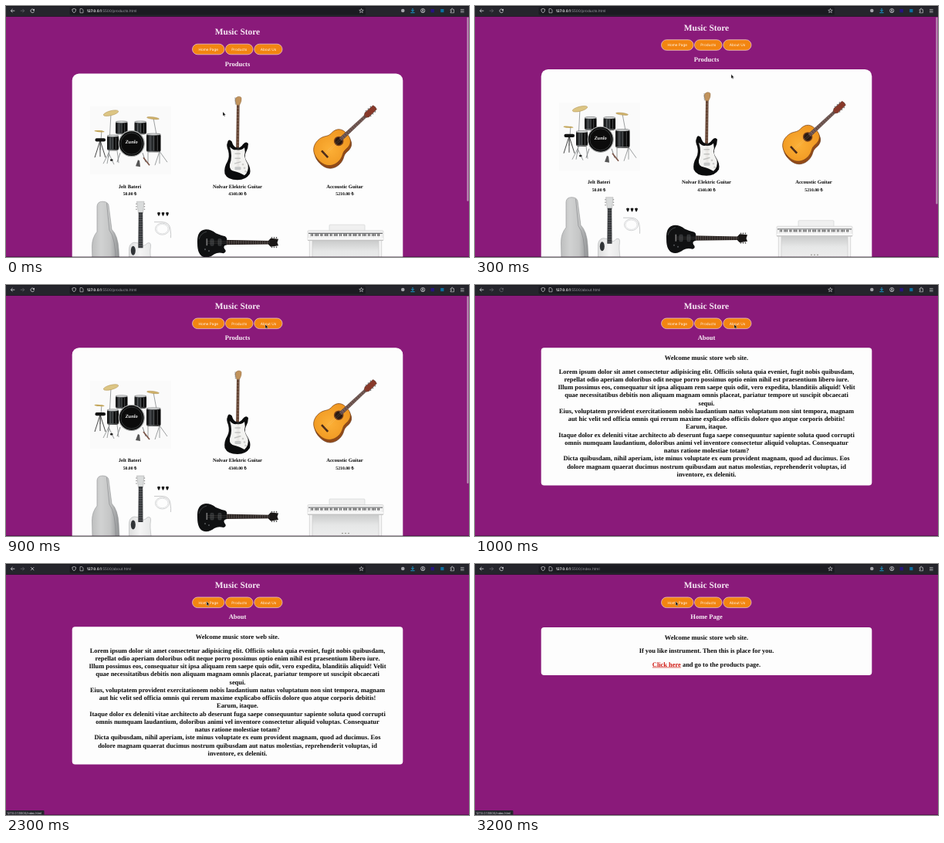
Write an HTML page with a canvas that moves like this. It is 600x325 px and loops after 3.3 s.

```html
<!DOCTYPE html>
<html lang="en">
<head>
<meta charset="utf-8">
<title>Music Store</title>
<style>
html, body { margin: 0; width: 100%; height: 100%; overflow: hidden; background: #8a1a7a; }
canvas { display: block; width: 600px; height: 325px; }
</style>
</head>
<body>
<canvas id="stage"></canvas>
<script>
const W = 600, H = 325, LOOP = 3300, STEP = 100;
const SERIF = '"Liberation Serif", "Times New Roman", serif';
const SANS = 'Inter, "Liberation Sans", sans-serif';
const canvas = document.getElementById('stage');
const ctx = canvas.getContext('2d');
const dpr = window.devicePixelRatio || 1;
canvas.width = W * dpr;
canvas.height = H * dpr;
ctx.textRendering = 'geometricPrecision';

const ABOUT = [
  'Lorem ipsum dolor sit amet consectetur adipisicing elit. Officiis soluta quia eveniet, fugit nobis quibusdam,',
  'repellat odio aperiam doloribus odit neque porro possimus optio enim nihil est praesentium libero iure.',
  'Illum possimus eos, consequatur sit ipsa aliquam rem saepe quis odit, vero expedita, blanditiis aliquid! Velit',
  'quae necessitatibus debitis non aliquam magnam omnis placeat, pariatur tempore ut suscipit obcaecati',
  'sequi.',
  'Eius, voluptatem provident exercitationem nobis laudantium natus voluptatum non sint tempora, magnam',
  'aut hic velit sed officia omnis qui rerum maxime explicabo officiis dolore quo atque corporis debitis!',
  'Earum, itaque.',
  'Itaque dolor ex deleniti vitae architecto ab deserunt fuga saepe consequuntur sapiente soluta quod corrupti',
  'omnis numquam laudantium, doloribus animi vel inventore consectetur aliquid voluptas. Consequatur',
  'natus ratione molestiae totam?',
  'Dicta quibusdam, nihil aperiam, iste minus voluptate ex eum provident magnam, quod ad ducimus. Eos',
  'dolore magnam quaerat ducimus nostrum quibusdam aut natus molestias, reprehenderit voluptas, id',
  'inventore, ex deleniti.'
];
const PRODUCTS = [
  ['Jelt Bateri', '50.00 ₺', 160.5],
  ['Nolvar Elektric Guitar', '4340.00 ₺', 300],
  ['Accoustic Guitar', '5210.00 ₺', 439]
];
const BUTTONS = [['Home Page', 241.5, 41.5], ['Products', 284.5, 35.5], ['About Us', 321.8, 36.2]];
// time, x, y of the pointer tip
const PATH = [[0, 281, 137], [300, 332, 88.5], [700, 336, 51], [1100, 336, 51], [1500, 260, 48.5]];

function rect(x, y, w, h, fill) {
  ctx.fillStyle = fill;
  ctx.fillRect(x, y, w, h);
}
function round(x, y, w, h, r, fill, stroke, lw = 0.7) {
  ctx.beginPath();
  ctx.roundRect(x, y, w, h, r);
  if (fill) { ctx.fillStyle = fill; ctx.fill(); }
  if (stroke) { ctx.strokeStyle = stroke; ctx.lineWidth = lw; ctx.stroke(); }
}
function oval(x, y, rx, ry, rot, fill, stroke, lw = 0.8) {
  ctx.beginPath();
  ctx.ellipse(x, y, rx, ry, rot, 0, Math.PI * 2);
  if (fill) { ctx.fillStyle = fill; ctx.fill(); }
  if (stroke) { ctx.strokeStyle = stroke; ctx.lineWidth = lw; ctx.stroke(); }
}
function shape(d, fill, stroke, lw = 0.8) {
  const p = new Path2D(d);
  if (fill) { ctx.fillStyle = fill; ctx.fill(p); }
  if (stroke) { ctx.strokeStyle = stroke; ctx.lineWidth = lw; ctx.stroke(p); }
}
function text(s, x, y, font, fill, align = 'center') {
  ctx.font = font;
  ctx.textAlign = align;
  ctx.fillStyle = fill;
  ctx.fillText(s, x, y);
}
const serif = (s, x, y, size, fill = '#080808', align) =>
  text(s, x, y, `bold ${size}px ${SERIF}`, fill, align);
function blend(x0, y0, x1, y1, ...stops) {
  const g = ctx.createLinearGradient(x0, y0, x1, y1);
  stops.forEach((c, i) => g.addColorStop(i / (stops.length - 1), c));
  return g;
}

function drum(x, y, w, h) {
  round(x, y, w, h, 3, blend(x, 0, x + w, 0, '#111', '#33373a', '#0b0b0b', '#050505'));
  oval(x + w / 2, y + 1, w / 2, 1.3, 0, '#d4d6d6', '#6e7173', 0.5);
  rect(x + 1, y + h - 1.3, w - 2, 0.7, '#a9abab');
  for (let i = 1; i < 4; i++) rect(x + w * i / 4, y + 3, 0.5, h - 5, '#8f9294');
}

function drumKit() {
  rect(109, 124, 105, 88, '#fafafa');
  const metal = '#85888a';
  shape('M136 133 L133 190 M133 184 L126 198 M133 184 L140 199 M191 139 L199 182 M199 182 L193 200 M199 182 L209 196 M124 155 L122 180', null, metal, 0.8);
  oval(136, 132.5, 10, 3, -0.25, '#dcc584', '#ab8a45', 0.5);
  oval(190.5, 139, 8, 1.4, 0.12, '#d0b26a', '#a08144', 0.4);
  oval(121, 156, 6.5, 1.1, 0.08, '#c4a75c');
  shape('M122 168 L115 190 M122 168 L129 190 M122 168 V189', null, '#333', 0.9);
  round(115.5, 165, 13.5, 4.2, 2, '#121212');
  drum(142, 143, 15.5, 17);
  drum(166.5, 143, 15.5, 17);
  drum(131, 161, 15, 20);
  shape('M134 181 L131 198 M144 181 L146 197 M184 183 V198 M199 183 V198', null, metal, 0.8);
  drum(182, 159, 18.5, 24);
  oval(162.7, 172, 16.5, 16.5, 0, '#0b0b0b', '#a9abab', 1.2);
  oval(162.7, 172, 14, 14, 0, null, '#44484a', 0.7);
  text('Zunlo', 162.7, 172, `italic bold 6.4px ${SERIF}`, '#f4f4f4');
  shape('M148 184 L144 196 M177 184 L181 196', null, metal, 1);
  shape('M168 201 L171 193 L173 194 L174 202 Z', '#555');
  shape('M178 190 L186 200', null, '#7b5548', 1.6);
  round(135, 192, 3.5, 2.5, 1, '#222');
}

function electric() {
  shape('M299 119 H302.6 L302 178 H298.2 Z', '#5b3826');
  for (let i = 0; i < 14; i++) rect(299, 122 + i * 4, 3, 0.35, '#a8907c');
  shape('M298.9 122 L297 116 Q297 112 301 111 Q305.5 111 305 114 Q305.5 117 302.6 122 Z', '#c1935c', '#8e6840', 0.5);
  for (let i = 0; i < 5; i++) oval(297 + i * 0.1, 113 + i * 1.9, 0.7, 0.6, 0, '#777');
  shape('M287 171 Q288 165 292.5 169 Q295 177 299 177 Q304 178 307 173 Q311 168 314 172 Q314 178 311 183 Q308 189 312 195 Q318 204 316 211 Q311 219 300 219 Q287 219 283.5 211 Q282 203 287 195 Q290 189 288 181 Q285 174 287 171 Z', '#0b0c0d');
  shape('M290 176 Q294 181 299 180 Q305 181 309 177 Q310.5 183 309 188 Q310 193 313.5 199 Q315 208 309 213 Q302 209 297 208 Q289 207 290 199 Q294 188 290 176 Z', '#f3f3f1');
  shape('M296.5 185 H304 M296.5 191 H304 M296 198 L304.5 195.5', null, '#c3c5c3', 1.4);
  round(296.5, 202, 8, 4, 1, '#c6c8c8');
  shape('M299.8 122 V202 M301.7 122 V202', null, '#b4aaa2', 0.25);
  for (const [x, y] of [[307, 199], [309, 203.5], [310.5, 208]]) oval(x, y, 1, 1, 0, '#d9d9d4', '#999', 0.3);
}

function acoustic() {
  ctx.save();
  ctx.translate(418, 181);
  ctx.rotate(-0.75);
  const body = 'M-18 0 C-18 -15 -8 -20 2 -19 C10 -18 11 -13.5 18 -14 C28 -15 33 -8 32 0 C33 8 28 15 18 14 C11 13.5 10 18 2 19 C-8 20 -18 15 -18 0 Z';
  ctx.save();
  ctx.translate(-1.5, 3.5);
  shape(body, '#934a17', '#5b2e14', 0.6);
  ctx.restore();
  const wood = ctx.createRadialGradient(2, 0, 2, 4, 0, 28);
  wood.addColorStop(0, '#fbae35');
  wood.addColorStop(1, '#ee951f');
  shape(body, wood, '#7d451a', 0.7);
  oval(18, 0, 6.3, 6.3, 0, '#7a421c');
  oval(18, 0, 4.9, 4.9, 0, '#2a1a12');
  rect(-8, -6, 2.6, 12, '#4a2a18');
  shape('M21 -2.5 L66 -2 V2 L21 2.5 Z', '#5f4643');
  for (let i = 0; i < 12; i++) rect(25 + i * 3.3, -2.2, 0.35, 4.4, '#a08a80');
  shape('M65 -2 L68 -3.8 L82 -3.4 Q83.5 0 82 3.4 L68 3.8 L65 2 Z', '#88392a', '#4f251c', 0.5);
  for (let i = 0; i < 3; i++) {
    oval(70.5 + i * 4, -4.2, 0.9, 1, 0, '#777');
    oval(70.5 + i * 4, 4.2, 0.9, 1, 0, '#777');
  }
  shape('M-7 -1 L66 -1 M-7 1 L66 1', null, 'rgba(235,220,190,.5)', 0.3);
  ctx.restore();
}

function caseAndGuitar() {
  shape('M118 253 Q118.5 247 125 247 Q132 247 133 252 L137 283 Q145 291 146 309 L147 328 H112 L111.5 305 Q111.5 294 118 286 Z',
    blend(111, 0, 147, 0, '#bdbebe', '#d1d2d2', '#c5c6c6', '#8f9193'), '#909294', 0.6);
  shape('M130.5 249 L134 284 Q142 294 142.5 328', null, '#808285', 0.6);
  shape('M159.5 328 V311 Q159 301 166 300 Q172 300 174 303 Q179 306 183 301 Q188 299 187.5 305 Q186 313 188.5 328 Z',
    blend(159, 0, 189, 0, '#dcdddd', '#f4f4f4', '#e6e7e7'), '#b9bbbc', 0.7);
  oval(164.8, 310.5, 3, 6, 0, '#303336');
  shape('M169.5 247 H179 L177.5 262 H171.5 Z', '#d9dbdb', '#a5a5a5', 0.5);
  for (let i = 0; i < 3; i++) {
    oval(169, 250 + i * 3.5, 0.9, 0.8, 0, '#999');
    oval(179.4, 250 + i * 3.5, 0.9, 0.8, 0, '#999');
  }
  shape('M171.8 261 H177.2 L177.5 307 H171.3 Z', '#393b3e');
  for (let i = 0; i < 14; i++) rect(171.8, 264 + i * 3.1, 5.3, 0.3, '#9a9c9d');
  for (const x of [198, 203.5, 209]) shape(`M${x - 2} 261.5 Q${x} 260.1 ${x + 2} 261.5 Q${x + 1.5} 264.5 ${x} 266 Q${x - 1.5} 264.5 ${x - 2} 261.5 Z`, '#151515');
  oval(202.5, 282.5, 9, 7.5, 0, null, '#c9cbcc', 0.8);
  oval(202.5, 282.5, 7.5, 6.2, 0, null, '#d6d7d8', 0.7);
  shape('M192 273.5 H202 Q212 273.5 213 283 Q214 290 213.5 294', null, '#bbbdbe', 0.8);
}

function blackGuitar() {
  shape('M279 296.5 L342 297.7 V302.2 L279 303 Z', '#241d1b');
  for (let i = 0; i < 18; i++) rect(286 + i * 3.1, 297.3, 0.35, 5, '#8c8580');
  shape('M340 297.7 L343 294.5 L353 295.5 L351.5 300 L353 304 L343 305.5 L340 302.5 Z', '#1a1716');
  for (let i = 0; i < 3; i++) {
    oval(344.5 + i * 3, 293.8, 0.8, 1, 0, '#555');
    oval(344.5 + i * 3, 306, 0.8, 1, 0, '#555');
  }
  shape('M248 301 Q247 284 259 283 Q266 283 272 288 Q279 291 284 292 Q287 294 286 297 V303 Q281 304 283 308 Q287 312 282 314 Q275 312 270 315 Q264 320 257 319 Q248 317 248 301 Z', '#101112');
  shape('M250 296 Q252 288 260 286', null, '#4b4e50', 0.8);
  round(265, 295.5, 4, 8.5, 0.7, '#2b2d2f', '#5d6062', 0.4);
  round(275, 295.5, 4, 8.5, 0.7, '#2b2d2f', '#5d6062', 0.4);
  rect(259.5, 295, 1.6, 9, '#777');
  shape('M260 298.5 L342 299 M260 301 L342 300.6', null, '#77706c', 0.3);
  oval(258, 309, 1.1, 1.1, 0, '#505356');
  oval(263, 311, 1.1, 1.1, 0, '#505356');
}

function piano() {
  round(419, 277, 46, 9, 1, '#f0f0f0', '#cfd0d0', 0.6);
  rect(393, 296, 94, 32, '#f4f4f4');
  rect(397, 297, 86, 31, blend(0, 297, 0, 325, '#c9caca', '#e6e7e7', '#ededed'));
  shape('M393.3 297 V328 M397 297 V328 M483 297 V328 M486.7 297 V328', null, '#c6c7c7', 0.6);
  round(391, 284.5, 98, 13, 1.2, '#f1f1f1', '#c9caca', 0.6);
  rect(392, 287.6, 96, 1.2, '#6f7173');
  rect(394, 288.8, 91.5, 4.8, '#fcfcfc');
  for (let i = 0; i < 52; i++) {
    const x = 394 + i * 1.76;
    rect(x, 288.8, 0.25, 4.8, '#b5b5b5');
    if (![2, 6].includes(i % 7)) rect(x + 1.2, 288.8, 1, 3, '#242526');
  }
  rect(391, 294.2, 98, 2.4, '#fafafa');
  rect(391, 296.6, 98, 0.9, '#b9baba');
  for (let i = 0; i < 3; i++) oval(436 + i * 4, 321.5, 1.1, 0.8, 0, '#9b9a94');
}

function header(title) {
  serif('Music Store', 300, 30.8, 11.4, '#f6e9f4');
  for (const [label, x, w] of BUTTONS) {
    round(x, 43, w, 13.6, 6.8, '#f28511', '#efd2dc', 0.7);
    text(label, x + w / 2, 51.6, `4.7px ${SANS}`, '#fff8ee');
  }
  serif(title, 300, 71.4, 8.5, '#f8eff6');
}

function productsPage(off) {
  ctx.save();
  ctx.translate(0, off);
  header('Products');
  round(85.7, 81.2, 428.6, 300, 9, '#fdfdfd');
  drumKit();
  electric();
  acoustic();
  for (const [name, price, x] of PRODUCTS) {
    serif(name, x, 229.4, 6.57);
    serif(price, x, 239.1, 5.75);
  }
  caseAndGuitar();
  blackGuitar();
  piano();
  ctx.restore();
  round(597.4, 14.5, 2, 242.5 - off * 0.7, 1, '#bd93b8');
}

function aboutPage() {
  header('About');
  round(85.7, 81.3, 428.6, 178.2, 4, '#fdfdfd');
  serif('Welcome music store web site.', 300, 97.4, 8.42);
  ABOUT.forEach((line, i) => serif(line, 300, 114.8 + i * 10.23, 8.42));
}

function homePage() {
  header('Home Page');
  round(85.7, 82, 428.6, 62, 4, '#fdfdfd');
  serif('Welcome music store web site.', 300, 98, 8.42);
  serif('If you like instrument. Then this is place for you.', 300, 115.3, 8.42);
  const link = 'Click here', rest = ' and go to the products page.';
  ctx.font = `bold 8.42px ${SERIF}`;
  const lw = ctx.measureText(link).width;
  const x = 300 - (lw + ctx.measureText(rest).width) / 2;
  serif(link, x, 132.7, 8.42, '#cf1710', 'left');
  rect(x, 133.6, lw, 0.7, '#cf1710');
  serif(rest, x + lw, 132.7, 8.42, '#080808', 'left');
}

function toolbar(file, reload) {
  const ink = '#dcdce0', dim = '#66666e';
  rect(0, 0, W, 13.5, '#25252c');
  rect(0, 0, W, 0.8, '#17171c');
  rect(0, 13, W, 0.6, '#111116');
  round(82.5, 1.4, 383.5, 10.2, 1.5, '#1b1b21');
  shape('M11.3 6.2 H6.3 M8.5 4 L6.3 6.2 L8.5 8.4', null, ink, 0.8);
  shape('M18.7 6.2 H23.7 M21.5 4 L23.7 6.2 L21.5 8.4', null, dim, 0.8);
  if (reload === 'stop') {
    shape('M32.2 4.2 L36.2 8.2 M36.2 4.2 L32.2 8.2', null, ink, 0.8);
  } else {
    const c = reload === 'dim' ? dim : ink;
    shape('M36.1 5 A2.3 2.3 0 1 0 36.5 6.7', null, c, 0.8);
    shape('M36.9 3.6 V6 H34.5 Z', c);
  }
  shape('M88.2 3.4 L90.6 4.3 Q90.7 7.5 88.2 9 Q85.7 7.5 85.8 4.3 Z', null, ink, 0.7);
  shape('M96 3.6 H98.6 L100 5 V8.8 H96 Z', null, ink, 0.6);
  const host = '127.0.0.1';
  text(host, 104.8, 7.9, `600 4.75px ${SANS}`, '#fbfbfd', 'left');
  const x = 104.8 + ctx.measureText(host).width;
  text(':5500/' + file, x, 7.9, `4.75px ${SANS}`, '#9c9ca4', 'left');
  let star = '';
  for (let i = 0; i < 10; i++) {
    const r = i % 2 ? 1.25 : 2.9, a = i * Math.PI / 5;
    star += (i ? 'L' : 'M') + (460.5 + r * Math.sin(a)) + ' ' + (6.3 - r * Math.cos(a));
  }
  shape(star + 'Z', null, ink, 0.6);
  oval(514.3, 6, 2.3, 2.3, 0, '#a5a5ab');
  shape('M527 3 V7 M525.2 5.3 L527 7.2 L528.8 5.3 M524.4 8.7 H529.6', null, '#19a5df', 0.9);
  oval(540.2, 6, 2.6, 2.6, 0, null, ink, 0.7);
  oval(540.2, 5.3, 0.9, 0.9, 0, ink);
  shape('M538.4 7.9 Q540.2 6 542 7.9', null, ink, 0.7);
  round(550.5, 4, 4.4, 4.4, 0, '#251382');
  round(563.2, 4, 4.2, 4.2, 0, '#0b6ea0');
  shape('M576 4.7 H577.4 Q577 3 578.2 3 Q579.4 3 579 4.7 H580.5 V8.8 H576 V7.5 Q577.6 7.5 577.6 6.6 Q577.6 5.8 576 6 Z', null, ink, 0.6);
  for (let i = 0; i < 3; i++) rect(589, 4.2 + i * 1.8, 4.6, 0.6, ink);
}

function pointerAt(t) {
  const i = PATH.findIndex(p => p[0] > t);
  if (i < 0) return PATH[PATH.length - 1].slice(1);
  const [t0, x0, y0] = PATH[i - 1], [t1, x1, y1] = PATH[i];
  const k = (t - t0) / (t1 - t0), e = k * k * (3 - 2 * k);
  return [x0 + (x1 - x0) * e, y0 + (y1 - y0) * e];
}
function pointer(t) {
  const [x, y] = pointerAt(t);
  ctx.save();
  ctx.translate(x, y);
  if (t >= 1400 && t < 1700) {
    shape('M0 0.4 Q0.7 -0.3 1.3 0.4 V2.4 L3.6 3 Q4 4 3.3 6 H0.7 L-1.1 3.4 Q-0.8 2.8 0 3.4 Z', '#fff', '#222', 0.5);
  } else {
    shape('M0 0 V5.2 L1.2 4.2 L2 6 L2.9 5.6 L2.1 3.9 H3.7 Z', '#080808', '#e8e8e8', 0.35);
  }
  ctx.restore();
}

function draw(t) {
  ctx.setTransform(dpr, 0, 0, dpr, 0, 0);
  rect(0, 0, W, H, '#8a1a7a');
  let file = 'products.html', reload = 'on';
  if (t < 1000) {
    productsPage(t < 700 ? 6.2 * Math.exp(-t / 140) : 0);
  } else if (t < 2400) {
    file = 'about.html';
    if (t < 1200) reload = 'dim';
    if (t >= 2300) reload = 'stop';
    aboutPage();
  } else {
    file = 'index.html';
    if (t < 2800) reload = 'dim';
    homePage();
  }
  rect(0, 324, W, 1, 'rgba(30, 5, 30, .4)');
  toolbar(file, reload);
  if (t >= 1600 && t < 2400 || t >= 2500) {
    round(-1, 319, 50.5, 7, 1, '#25252c');
    text('127.0.0.1:5500/index.html', 1.3, 323.6, `3.8px ${SANS}`, '#ececf0', 'left');
  }
  pointer(t);
}

function tick(now) {
  draw(Math.floor(now % LOOP / STEP) * STEP);
  requestAnimationFrame(tick);
}
draw(0);
requestAnimationFrame(tick);
</script>
</body>
</html>
```
